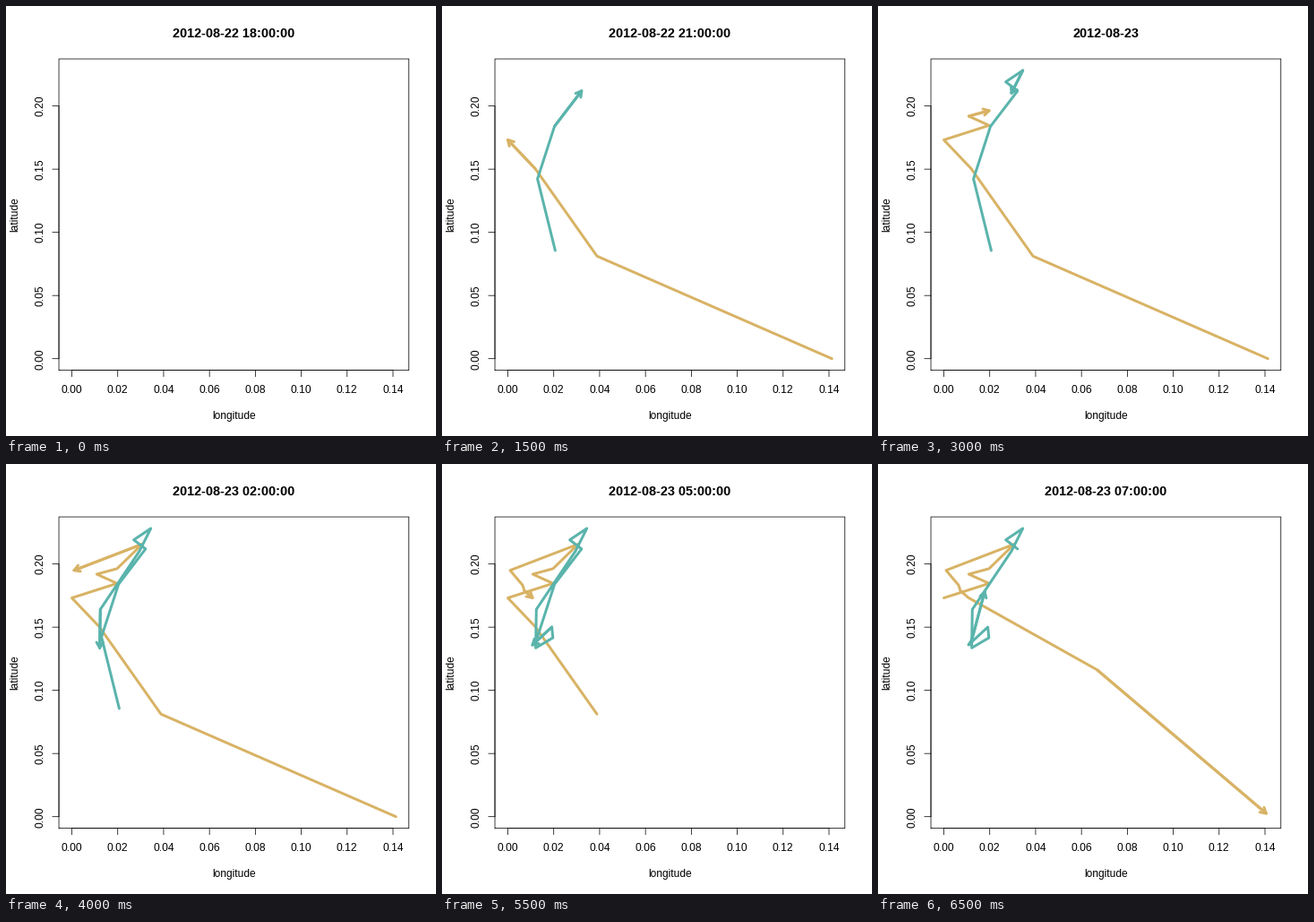
A matplotlib script that plays this animation: 480 by 480 pixels, repeating every 7 s.

```python
import numpy as np
import matplotlib.pyplot as plt
from matplotlib.animation import FuncAnimation

SIZE, DPI = 480, 72          # at 72 dpi one point is one pixel
STEPS, TAIL = 14, 10         # hourly steps, segments kept in the trail
LEFT, RIGHT, TOP, BOTTOM = 59.04, 449.76, 59.04, 406.56
X0, Y0 = 73.51, 393.69       # pixel position of (0, 0)
X_UNIT, Y_UNIT = 2560.6, 1410.4
HEAD = 7.2

# hourly positions in pixels
GOLD = np.array([
    (435.3, 393.7), (173, 279.2), (104, 181.5), (73.5, 149.5), (124, 133.3),
    (101.3, 123), (124, 116.8), (152, 89.5), (76, 118.7), (90, 135.3),
    (92, 141.5), (101, 149.3), (244.5, 229.7), (433.3, 390)])
TEAL = np.array([
    (126.4, 273), (106.6, 193), (125.6, 134.3), (155.8, 94.8), (142.6, 84.7),
    (161.7, 71.9), (149, 97.2), (105.3, 162.3), (104.6, 205.3), (123.8, 194),
    (122.6, 182), (101, 202), (104.8, 196), (119, 142.7)])

plt.rcParams["font.family"] = "Liberation Sans"
fig = plt.figure(figsize=(SIZE / DPI, SIZE / DPI), dpi=DPI, facecolor="white")
ax = fig.add_axes([0, 0, 1, 1])
ax.set_xlim(0, SIZE)
ax.set_ylim(SIZE, 0)
ax.axis("off")


def stroke(xs=(), ys=(), color="black", width=0.75):
    line, = ax.plot(xs, ys, color=color, lw=width, solid_capstyle="round",
                    solid_joinstyle="round", snap=False)
    return line


def label(x, y, text, size=12, **kw):
    return ax.text(x, y, text, fontsize=size, ha="center", va="baseline",
                   rotation_mode="anchor", **kw)


def draw_axes():
    stroke([LEFT, RIGHT, RIGHT, LEFT, LEFT], [BOTTOM, BOTTOM, TOP, TOP, BOTTOM])
    xs = [X0 + X_UNIT * 0.02 * i for i in range(8)]
    ys = [Y0 - Y_UNIT * 0.05 * i for i in range(5)]
    stroke([xs[0], xs[-1]], [BOTTOM, BOTTOM])
    stroke([LEFT, LEFT], [ys[0], ys[-1]])
    for i, x in enumerate(xs):
        stroke([x, x], [BOTTOM, BOTTOM + HEAD])
        label(x, 432, f"{0.02 * i:.2f}")
    for i, y in enumerate(ys):
        stroke([LEFT - HEAD, LEFT], [y, y])
        label(42, y, f"{0.05 * i:.2f}", rotation=90)
    label((LEFT + RIGHT) / 2, 461, "longitude")
    label(13, (TOP + BOTTOM) / 2, "latitude", rotation=90)


class Track:
    def __init__(self, points, color):
        self.points = points
        self.trail, self.shaft, self.head = (
            stroke(color=color, width=3) for _ in range(3))

    def show(self, step):
        if step == 0:
            for line in (self.trail, self.shaft, self.head):
                line.set_data([], [])
            return
        pts = self.points[max(0, step - TAIL):step + 1]
        self.trail.set_data(*pts.T)
        self.shaft.set_data(*pts[-2:].T)
        tip = pts[-1]
        back = np.arctan2(*(pts[-2] - tip)[::-1])
        barbs = [tip + HEAD * np.array([np.cos(a), np.sin(a)])
                 for a in (back - np.pi / 6, back + np.pi / 6)]
        self.head.set_data(*np.array([barbs[0], tip, barbs[1]]).T)


draw_axes()
title = label((LEFT + RIGHT) / 2, 35, "", 14.4, weight="bold")
tracks = [Track(GOLD, "#D8B365"), Track(TEAL, "#5AB4AC")]


def update(step):
    day, hour = divmod(18 + step, 24)
    clock = f" {hour:02d}:00:00" if hour else ""
    title.set_text(f"2012-08-{22 + day}{clock}")
    for track in tracks:
        track.show(step)
    return []


anim = FuncAnimation(fig, update, frames=STEPS, interval=500,
                     init_func=lambda: update(0), repeat=True, repeat_delay=0)
plt.show()
```
